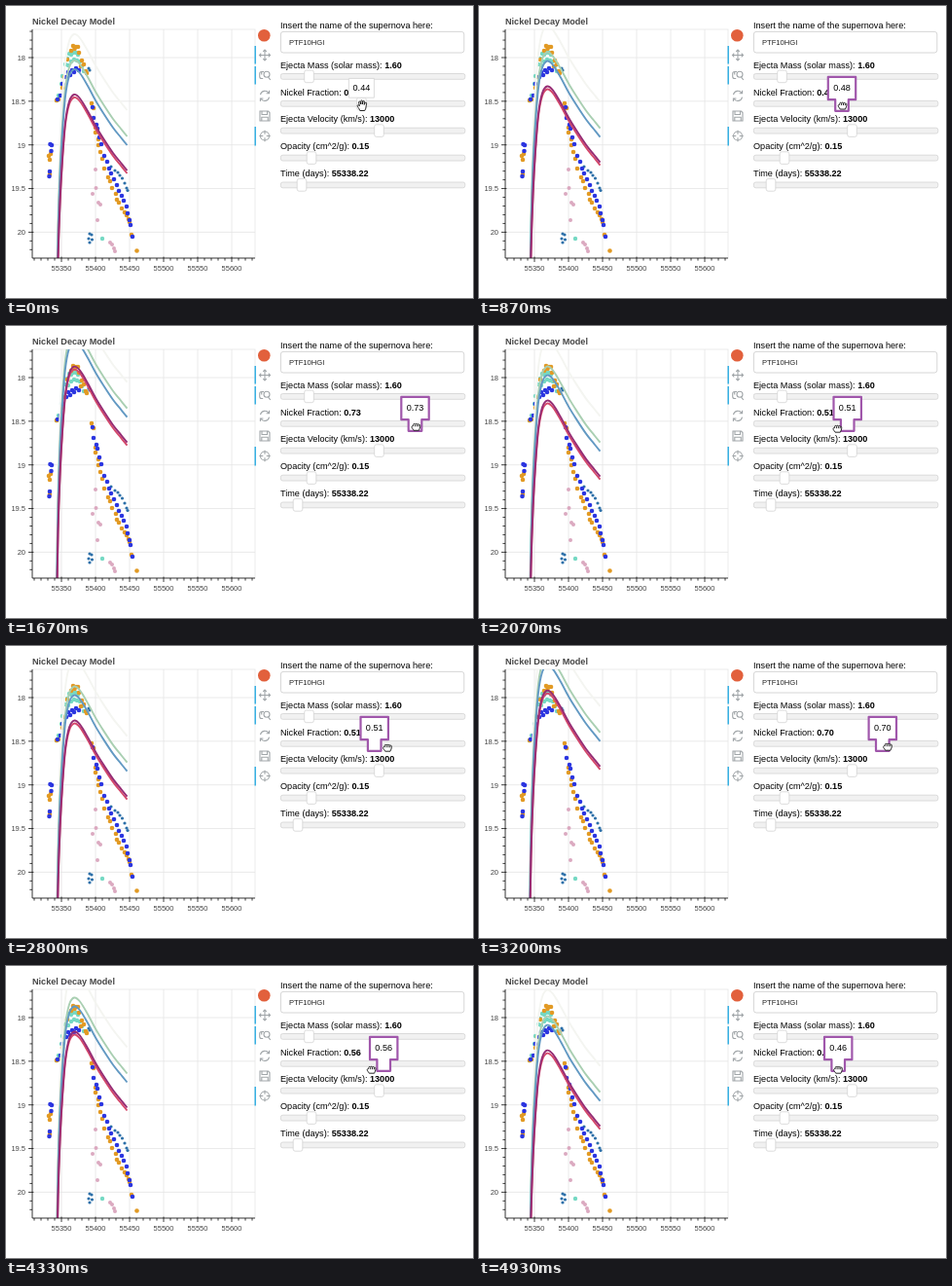
Recreate the animation shown at these times as an HTML page. Size 480 by 300 pixels, loop 4.99 s.

```html
<!DOCTYPE html>
<html lang="en">
<head>
<meta charset="utf-8">
<title>Nickel Decay Model</title>
<style>
html, body { margin: 0; width: 100%; height: 100%; overflow: hidden; background: #fff; }
svg { display: block; width: 480px; height: 300px; font-family: "Liberation Sans", Arial, sans-serif; }
</style>
</head>
<body>
<svg id="stage" viewBox="0 0 480 300" xmlns="http://www.w3.org/2000/svg">
  <defs>
    <clipPath id="frame"><rect x="27" y="24" width="229" height="235"/></clipPath>
  </defs>
  <text x="27" y="18.5" font-size="9.1" font-weight="bold" fill="#444">Nickel Decay Model</text>
  <g id="grid" stroke="#e5e5e5" stroke-width=".8" fill="none"></g>
  <g clip-path="url(#frame)">
    <g id="dots"></g>
    <g id="curves" fill="none" stroke-width="1.9" stroke-linejoin="round"></g>
  </g>
  <g id="axes" stroke="#111" stroke-width=".8"></g>
  <g id="labels" font-size="7.5" fill="#444"></g>
  <g id="tools" fill="none" stroke="#a1a6a9" stroke-width="1.1">
    <circle cx="265.3" cy="30.2" r="6.3" fill="#e2603c" stroke="none"/>
    <path d="M260.5 50.5h11M266 45v11M262.3 48.7l-1.8 1.8 1.8 1.8M269.7 48.7l1.8 1.8-1.8 1.8M264.2 46.8l1.8-1.8 1.8 1.8M264.2 54.2l1.8 1.8 1.8-1.8"/>
    <path d="M265 67.5h-2.3a2 2 0 0 0-2 2v3a2 2 0 0 0 2 2h1.5M262.7 67.5v3M269.5 73.2l2.3 2.6"/>
    <circle cx="268" cy="70.3" r="3"/>
    <path d="M261.5 91.2a4.7 4.7 0 0 1 8.6-1.7M270.5 93.6a4.7 4.7 0 0 1-8.6 1.7M270.6 86.8v3h-3M261.4 98v-3h3"/>
    <path d="M261 108h8.5l1.5 1.5v8.5h-10zM263 108v3.5h5.5V108M262.8 118v-3.7h6.4v3.7"/>
    <circle cx="266" cy="133.5" r="4.5"/>
    <path d="M266 127.8v4M266 135.2v4M260.3 133.5h4M267.7 133.5h4"/>
    <path d="M256.2 41v18.5M256.2 62v18.5M256.2 124v19.5" stroke="#26aae1" stroke-width="1.4"/>
  </g>
  <g id="panel" font-size="9.1" fill="#000">
    <text x="282" y="22.5">Insert the name of the supernova here:</text>
    <rect x="282.4" y="26.4" width="188.4" height="21.6" rx="2.6" fill="#fff" stroke="#ccc" stroke-width=".8"/>
    <text x="291" y="40.3" font-size="7.6" fill="#222">PTF10HGI</text>
  </g>
  <g id="tip">
    <path id="ring"/>
    <text id="tipText" y="87.2" font-size="9.1" text-anchor="middle"></text>
  </g>
  <g id="hand" fill="#fff" stroke="#111" stroke-width=".9" stroke-linejoin="round">
    <path id="open" d="M-2.2 5.5C-3 3-5 1.5-4.8 .2c.5-1 1.6-.4 2.2 .6L-3.4-3c0-1.3 1.3-1.4 1.6-.3L-1.2-1-1.2-4.2c.1-1.2 1.5-1.2 1.6 0V-1L1-3.9c.3-1.1 1.6-.8 1.5 .3L2.2-.6 3.2-2.4c.6-.9 1.7-.3 1.4 .7C3.9 1.5 4.2 3 2.7 5.5z"/>
    <path id="fist" d="M-2.3 4.2C-3 2.6-4.5 1.8-4.3 .4c.2-.9 1-1 1.5-.7V-1.6c.1-1.2 1.5-1.3 1.9-.4 .4-1 1.6-.9 1.9 0 .5-.7 1.6-.6 1.8 .3 .7-.4 1.6 0 1.6 1C4.4 1.5 3.5 2.8 3 4.2zM-.9-1.8V.2M1-1.8V.2M2.8-1.5V.3"/>
  </g>
</svg>
<script>
const LOOP = 4990, TICK = 200 / 3, START = 0.44, MAG = 89.7;
const $ = id => document.getElementById(id);

function add(parent, tag, attrs, text) {
  const el = document.createElementNS("http://www.w3.org/2000/svg", tag);
  for (const k in attrs) el.setAttribute(k, attrs[k]);
  if (text !== undefined) el.textContent = text;
  return parent.appendChild(el);
}
const line = (parent, x1, y1, x2, y2) => add(parent, "line", { x1, y1, x2, y2 });

// Axes and grid
const xOf = day => 57 + (day - 55350) * 0.7;
const yOf = mag => 53 + (mag - 18) * MAG;
add($("grid"), "rect", { x: 27, y: 24, width: 229, height: 235 });
line($("axes"), 27, 24, 27, 259);
line($("axes"), 27, 259, 256, 259);
for (let day = 55310; day <= 55630; day += 10) {
  const x = xOf(day), major = day % 50 === 0;
  line($("axes"), x, major ? 257.6 : 259, x, major ? 263 : 261.6);
  if (!major) continue;
  line($("grid"), x, 24, x, 259);
  add($("labels"), "text", { x, y: 272.2, "text-anchor": "middle" }, day);
}
for (let i = 177; i <= 202; i++) {
  const y = yOf(i / 10), major = i % 5 === 0;
  line($("axes"), major ? 23 : 24.4, y, major ? 28.4 : 27, y);
  if (!major) continue;
  line($("grid"), 27, y, 256, y);
  add($("labels"), "text", { x: 20, y: y + 2.8, "text-anchor": "end" }, i / 10);
}

// Observations, as x,y pairs
const series = [
  ["#2c6fa8", 1.6, [85,64, 86,66, 86,234, 85,239, 88,235, 86,243, 88.5,240, 108,165, 112,169, 115,171,
    117,174, 119.5,177, 122,182, 124,187, 125,189.5]],
  ["#dba9c0", 2, [92,168, 92.5,187, 89,193, 95,202, 97,204, 94,220, 107,243, 109,245, 111,249, 112,252]],
  ["#75d9c3", 2.2, [52,97, 54,92, 57,80, 58,72, 61,60, 63,54, 65,49, 67,50, 69,48, 72,48, 74,50, 76,57,
    78,62, 80,67, 64,61, 67,57, 70,55, 73,56, 99,239]],
  ["#e29a24", 2.3, [44,154, 46,152, 45,158, 45,173, 52,97, 54,96, 58,84, 60,73, 63,55, 67,46, 69,41,
    70.5,44, 72,42, 74,42, 75,48, 77,62, 78,56, 80,60, 82,67, 83,69, 88,100, 90,105, 92,125, 92,130,
    95,137, 95,143, 97,150, 99,157, 101,167, 105,176, 107,180, 109,187, 113,193, 114,199, 116,202,
    119,208, 122,212, 124,215, 126,219, 127,222, 129,235, 134.5,251.5]],
  ["#2b35e0", 2.3, [44.5,175, 45,170, 46.5,149, 47,143, 45.5,142, 53,96, 56,92, 58,80, 62,73, 64,68,
    66,71, 68,66, 70,68, 72,64, 75,66, 89,104, 90,115, 93,122, 94,126, 96,135, 98,142, 101,154, 104,160,
    106,167, 108,172, 111,178, 114,184, 116,190, 119,195, 121,200, 124,206, 125,213, 127,220, 128,225,
    130,237]]
];
for (const [fill, r, pts] of series)
  for (let i = 0; i < pts.length; i += 2)
    add($("dots"), "circle", { cx: pts[i], cy: pts[i + 1], r, fill });

// Light curve relative to its peak, drawn as a smooth spline
const shape = [[-18,260], [-16.5,170], [-14.5,110], [-12,65], [-9,28], [-5,7], [0,0], [6,4],
  [14,17], [22,32], [30,45], [40,60], [48,70], [54.5,78]];
function spline(pts) {
  let d = "M" + pts[0];
  for (let i = 0; i + 1 < pts.length; i++) {
    const a = pts[i], b = pts[i + 1], p = pts[i - 1] || a, n = pts[i + 2] || b;
    const c1 = a.map((v, k) => v + (b[k] - p[k]) / 6);
    const c2 = b.map((v, k) => v - (n[k] - a[k]) / 6);
    d += `C${c1} ${c2} ${b}`;
  }
  return d;
}
const curveShape = spline(shape);
for (const [peak, stroke] of [[29, "#f4f5f1"], [56, "#a9cfb2"], [65, "#6299c3"], [94, "#d4486a"], [91, "#962c74"]])
  add($("curves"), "path", { d: curveShape, stroke, transform: `translate(70 ${peak})` });

// Sliders
function slider(label, value, y, x) {
  const text = add($("panel"), "text", { x: 282, y: y - 8.7 }, label + ": ");
  text.style.whiteSpace = "pre";
  const num = add(text, "tspan", { "font-weight": "bold" }, value);
  add($("panel"), "rect", { x: 282.4, y: y - 2.8, width: 189.4, height: 5.8, rx: 2, fill: "#f1f1f1",
    stroke: "#d3d3d3", "stroke-width": 0.8 });
  const knob = add($("panel"), "rect", { x: -4.8, y: y - 6.2, width: 9.6, height: 12.6, rx: 2, fill: "#fff",
    stroke: "#d3d3d3", "stroke-width": 0.8 });
  const move = px => knob.setAttribute("transform", `translate(${px} 0)`);
  move(x);
  return { num, move };
}
slider("Ejecta Mass (solar mass)", "1.60", 72.3, 311.5);
const nickel = slider("Nickel Fraction", "0.44", 100.2, 365.5);
slider("Ejecta Velocity (km/s)", "13000", 128, 383.5);
slider("Opacity (cm^2/g)", "0.15", 156, 314);
const days = slider("Time (days)", "55338.22", 183.8, 304);

// Motion, as [time, ...values]
const valueKeys = [[0, .44], [800, .44], [1200, .67], [1330, .69], [1500, .745], [1650, .735], [1870, .615],
  [2070, .51], [2330, .46], [2500, .46], [2800, .51], [3000, .625], [3200, .70], [3450, .78], [3600, .78],
  [3930, .65], [4070, .645], [4600, .48], [4800, .48], [4930, .46]];
const handKeys = [[0, 366, 102], [800, 366, 102], [1200, 411, 101], [1330, 418, 101], [1500, 430, 102],
  [1650, 424, 103], [1870, 389, 104], [2070, 368, 105], [2330, 365, 105], [2500, 365, 105], [2800, 392, 104],
  [3000, 409, 103], [3200, 420, 103], [3450, 434, 103], [3600, 431, 104], [3930, 391, 105],
  [4250, 377, 106], [4600, 371, 106], [4800, 371, 106], [4930, 369, 106]];
const dayKeys = [[0, 304], [333, 304], [533, 300]];

function at(keys, t) {
  const i = keys.findIndex(k => k[0] > t);
  if (i < 0) return keys[keys.length - 1].slice(1);
  const a = keys[i - 1], b = keys[i], u = (t - a[0]) / (b[0] - a[0]);
  return a.slice(1).map((v, k) => v + (b[k + 1] - v) * u);
}

const plainTip = "M-13 74.4h26v19.8h-26z";
const focusTip = "M-14.2 72.8h28.4v23.4h-7.4v11.6h-13.6v-11.6h-7.4z";

function draw(ms) {
  const t = Math.floor((ms % LOOP + 5) / TICK) * TICK;
  const value = Math.round(at(valueKeys, t)[0] * 100) / 100;
  const [hx, hy] = at(handKeys, t);
  const focused = t > 390;
  const x = 281.8 + 190 * value, label = value.toFixed(2);

  nickel.move(x);
  nickel.num.textContent = label;
  days.move(at(dayKeys, t)[0]);
  $("curves").setAttribute("transform", `translate(0 ${-2.5 * Math.log10(value / START) * MAG})`);

  $("tip").setAttribute("transform", `translate(${x} 0)`);
  $("tipText").textContent = label;
  const ring = $("ring");
  ring.setAttribute("d", focused ? focusTip : plainTip);
  ring.setAttribute("fill", "#fff");
  ring.setAttribute("stroke", focused ? "#a057ab" : "#d3d3d3");
  ring.setAttribute("stroke-width", focused ? 2.2 : 0.8);
  ring.setAttribute("stroke-linejoin", "round");

  $("hand").setAttribute("transform", `translate(${hx} ${hy})`);
  $("open").style.display = focused ? "none" : "";
  $("fist").style.display = focused ? "" : "none";
}

const begin = performance.now();
function loop() {
  draw(performance.now() - begin);
  requestAnimationFrame(loop);
}
draw(0);
requestAnimationFrame(loop);
</script>
</body>
</html>
```
